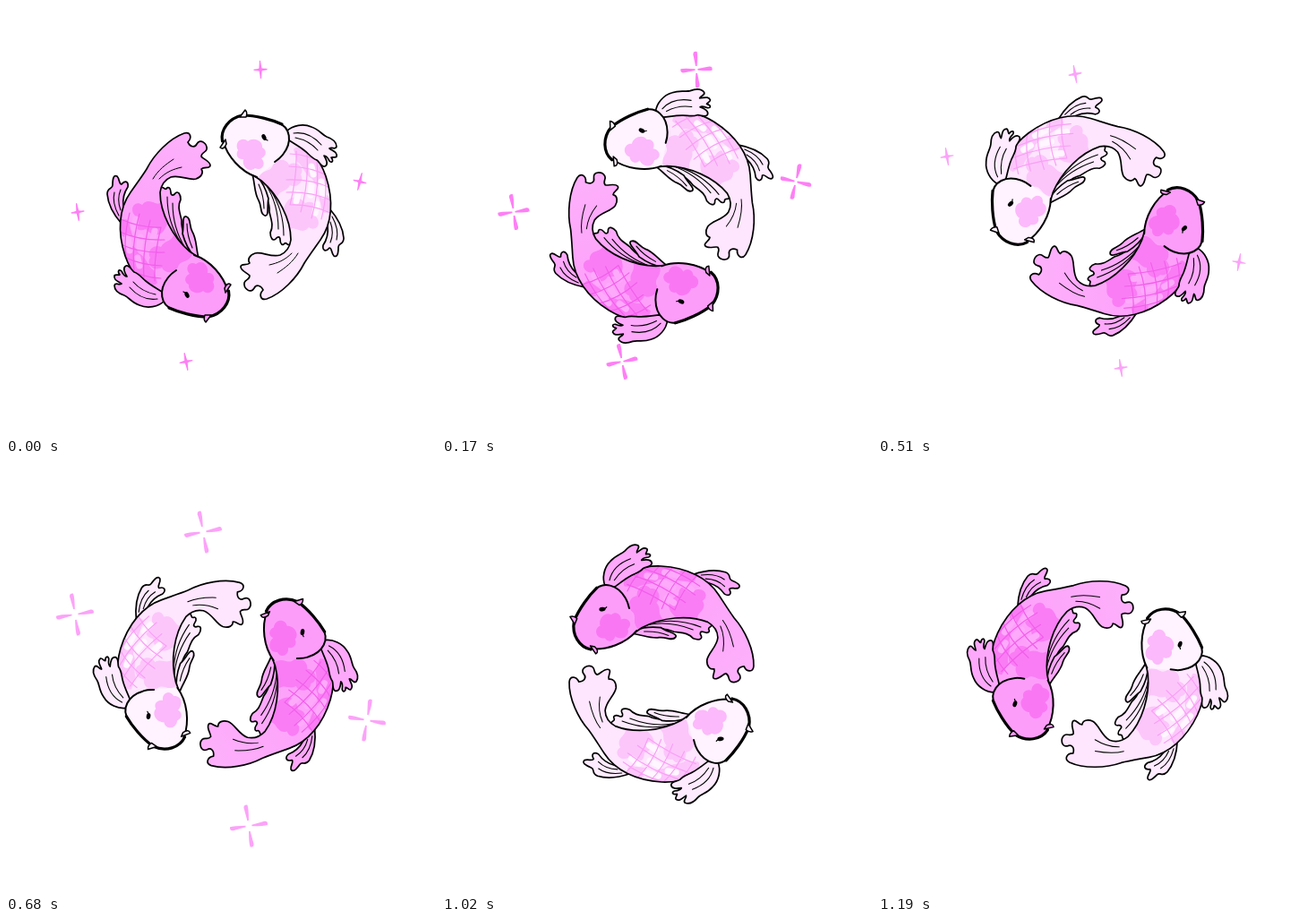
An HTML page with a canvas for the animation above (1.36 s loop, 480 by 480 pixels).

```html
<!DOCTYPE html>
<html lang="en">
<head>
<meta charset="utf-8">
<title>Circling koi</title>
<style>
  html, body { margin: 0; width: 100%; height: 100%; overflow: hidden; background: #fff; }
  canvas { display: block; width: 480px; height: 480px; }
</style>
</head>
<body>
<canvas id="stage" width="480" height="480"></canvas>
<script>
const ctx = document.getElementById('stage').getContext('2d');
const STEP = 170;
const CENTER = { x: 245, y: 234.5 };
const RAD = Math.PI / 180;
// Heading of the pair at each step, in degrees counter-clockwise
const TURN = [0, 39, 73.4, 108, 144.7, 191.3, 248.4, 315.9];

const path = d => new Path2D(d);
const flank = `C335 150 350 170 357 190 C366 217 364 243 351 261
  C344 271 338 279 333 287 C325 303 308 321 291 327 C284 329 282 322 287 317
  C284 311 279 311 277 315 C273 322 265 315 266 309 C267 305 272 306 272 301
  C270 298 262 296 262 291 C262 287 269 290 272 287 C269 283 272 278 278 276
  C286 274 296 281 306 278 C313 275 317 268 318 261
  C318 238 304 211 285 195 L276 189`;
const koi = {
  body: path(`M302 131 L314 140 ${flank} Z`),
  outline: path(`M314 140 ${flank}`),
  head: path(`M242 151 C240 138 249 125 264 122 C279 122 300 127 311 134
    C318 142 317 155 309 166 C301 176 292 181 280 191 C264 188 248 171 242 151 Z`),
  brow: path('M241.5 151 C239 138 249 125 264 122 C279 122 297 127 308 132'),
  jaw: path('M242 150 C247 168 262 185 280 191'),
  gill: path('M303 130 C318 135 320 152 309 166 C306 170 303 172 300 174'),
  whiskers: path('M261 124 L267 116 Q270 119 268 124 Z M245 149 L239 158 Q243 161 246 154 Z'),
  pectoral: path(`M313 140 C320 133 332 131 341 135 C350 138 353 144 358 146
    C364 148 369 152 369 157 C368 161 364 157 361 159 C365 162 370 163 369 168
    C368 170 364 168 363 169 C366 173 364 176 361 173 C359 169 357 167 355 167
    C358 172 360 177 356 179 C352 180 350 174 347 172 C341 170 338 165 334 162
    C328 157 322 154 316 150 Z`),
  pectoralRays: path('M321 142 C334 140 344 146 352 155 M323 147 C333 149 341 153 348 161'),
  fins: [
    path(`M361 226 C368 234 376 246 377 259 C377 267 371 264 371 269
      C371 276 370 281 366 279 C363 276 364 270 361 270 C357 275 353 273 354 267
      C358 261 360 254 359 246 L357 233 Z`),
    path(`M278 191 C286 202 295 217 294 230 C296 239 299 245 295 253
      C295 259 298 263 301 260 C303 257 306 257 306 261 C306 266 309 268 311 265
      C314 263 314 270 319 264 C324 238 307 207 287 194 Z`),
    path(`M275 188 C278 198 277 209 282 217 C286 224 283 232 289 234
      C294 235 291 224 293 215 C290 204 286 196 280 190 Z`)
  ],
  rays: path(`M364 235 C369 244 371 253 369 261 M362 241 C365 249 365 257 362 264
    M290 199 C300 215 304 231 304 249 M295 205 C306 222 310 239 310 256
    M282 199 C286 208 288 216 288 226`),
  tailRays: path('M326 276 C320 286 312 292 303 298 M319 276 C311 284 303 287 294 289'),
  cheek: path(`M259 161 C254 152 264 145 270 151 C276 146 287 150 286 158
    C293 162 289 169 285 170 C291 176 286 185 278 181 C271 187 263 179 265 171
    C258 172 256 165 259 161 Z`),
  patches: path(`M281 194 C286 180 296 187 298 177 C304 169 313 171 316 177
    C326 172 334 181 329 188 C334 196 324 204 317 200 C313 208 306 205 303 213 Z
    M310 226 C316 208 328 213 334 220 C344 215 351 226 345 234
    C354 242 346 253 338 247 C330 257 322 244 317 250 Z
    M321 160 C330 149 354 174 361 198 C354 205 345 202 342 193
    C334 190 331 177 325 174 Z
    M349 213 C356 207 365 212 364 226 C359 234 351 231 352 224 Z`),
  glints: path('M341 179 L343 188 M341 199 L340 211 M352 196 L354 211 M326 209 L324 218 M347 221 L345 231'),
  scales: path(`M317 165 Q339 166 353 176 M316 179 Q341 180 358 189
    M313 194 Q341 193 362 203 M313 208 Q341 207 363 217 M317 222 Q340 221 362 231
    M324 162 Q325 191 317 222 M336 166 Q338 198 329 230 M347 174 Q350 204 341 237
    M356 188 Q359 211 352 238`)
};

const palettes = {
  pale: { head: '#fff3ff', body: '#fee6fe', tail: '#fee6fe', fin: '#feebfe',
          cheek: '#fcb9fb', patch: '#fcc6fb', glint: '#fff6ff', scale: '#fa9ff6' },
  pink: { head: '#fd9dfa', body: '#fda0fa', tail: '#fdaffb', fin: '#fda8fa',
          cheek: '#fa77f4', patch: '#fa7df5', glint: '#fdaafb', scale: '#f25eeb' }
};

const fill = (shape, color) => { ctx.fillStyle = color; ctx.fill(shape); };
function stroke(shape, width, color = '#000') {
  ctx.lineWidth = width;
  ctx.strokeStyle = color;
  ctx.stroke(shape);
}

function drawKoi(angle, c) {
  ctx.save();
  ctx.translate(CENTER.x, CENTER.y);
  ctx.rotate(angle);
  ctx.translate(-CENTER.x, -CENTER.y);
  ctx.lineCap = ctx.lineJoin = 'round';

  for (const fin of koi.fins) {
    fill(fin, c.fin);
    stroke(fin, 1.7);
  }
  stroke(koi.rays, 1.1);

  const shade = ctx.createLinearGradient(325, 200, 280, 310);
  shade.addColorStop(0, c.body);
  shade.addColorStop(1, c.tail);
  fill(koi.body, shade);
  ctx.save();
  ctx.clip(koi.body);
  fill(koi.patches, c.patch);
  stroke(koi.glints, 7, c.glint);
  stroke(koi.scales, 1.2, c.scale);
  ctx.restore();
  stroke(koi.tailRays, 1);
  stroke(koi.outline, 1.7);

  fill(koi.pectoral, c.fin);
  stroke(koi.pectoral, 1.7);
  stroke(koi.pectoralRays, 1.1);

  fill(koi.head, c.head);
  fill(koi.cheek, c.cheek);
  stroke(koi.gill, 2);
  stroke(koi.jaw, 2);
  stroke(koi.brow, 3.2);
  fill(koi.whiskers, c.head);
  stroke(koi.whiskers, 1.5);

  ctx.fillStyle = '#000';
  ctx.beginPath();
  ctx.ellipse(288, 146.5, 2.3, 3.6, -0.45, 0, Math.PI * 2);
  ctx.fill();
  stroke(path('M288 148 L292 150'), 1.2);
  ctx.restore();
}

// Each sparkle: x, y, tilt in degrees
const sparkleSets = [
  { color: '#fe7ff5', stars: [[284, 71, -3], [395, 196, 14], [80, 230, -8], [201, 397, -11]] },
  { color: '#fba3f8', stars: [[220, 76, -10], [403, 286, 10], [77, 168, -9], [271, 404, -8]] }
];
// Inner and outer reach of the rays; steps without an entry show no sparkles
const sparkleSteps = [
  { set: 0, from: 0, to: 10 }, { set: 0, from: 4, to: 20 }, { set: 0, from: 13, to: 30 },
  { set: 1, from: 0, to: 10 }, { set: 1, from: 6, to: 23.5 }, { set: 1, from: 19, to: 36 }
];

function drawSparkles({ set, from, to }) {
  const { color, stars } = sparkleSets[set];
  ctx.fillStyle = color;
  for (const [x, y, tilt] of stars) {
    ctx.save();
    ctx.translate(x, y);
    ctx.rotate(tilt * RAD);
    for (let i = 0; i < 4; i++) {
      const inset = i % 2 ? 0 : 2.5;
      const a = Math.max(0, from - inset), b = to - inset;
      const inner = from ? 0.8 : 1.7, outer = from ? 2.7 : 0.9;
      ctx.beginPath();
      ctx.moveTo(a, -inner);
      ctx.lineTo(b - 3, -outer);
      ctx.quadraticCurveTo(b + 1, -outer, b, outer * 0.6);
      ctx.quadraticCurveTo(b - 4, outer, a, inner);
      ctx.fill();
      ctx.rotate(Math.PI / 2);
    }
    ctx.restore();
  }
}

function draw(time) {
  const step = Math.floor(time / STEP) % TURN.length;
  const angle = -TURN[step] * RAD;
  ctx.fillStyle = '#fff';
  ctx.fillRect(0, 0, 480, 480);
  if (sparkleSteps[step]) drawSparkles(sparkleSteps[step]);
  drawKoi(angle, palettes.pale);
  drawKoi(angle + Math.PI, palettes.pink);
}

const start = performance.now();
function tick() {
  draw(performance.now() - start);
  requestAnimationFrame(tick);
}
tick();
</script>
</body>
</html>
```
